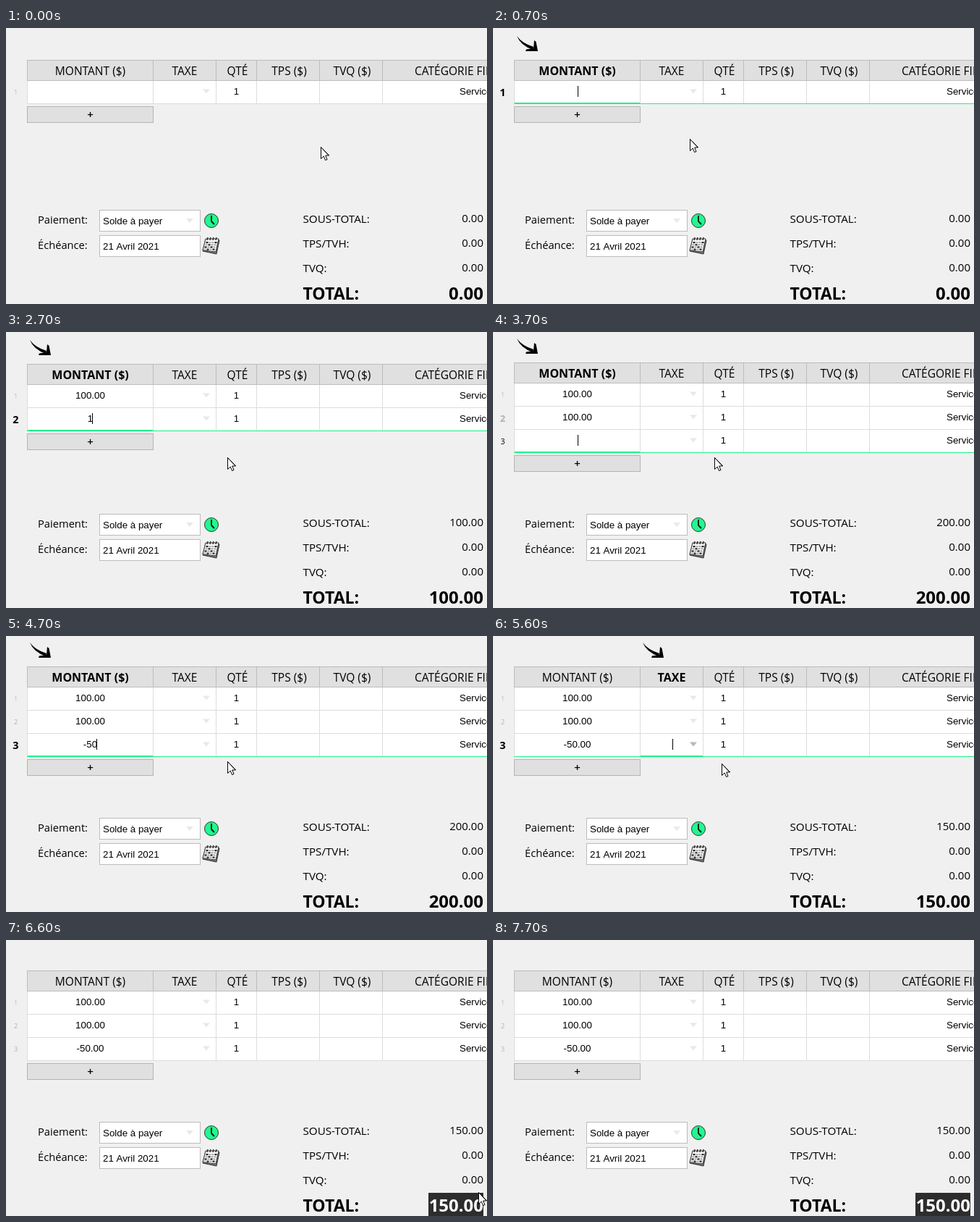
An HTML page with a canvas for the animation above (8.45 s loop, 665 by 381 pixels).

```html
<!DOCTYPE html>
<html lang="fr">
<head>
<meta charset="utf-8">
<title>Facture</title>
<style>
  html, body { margin: 0; width: 100%; height: 100%; overflow: hidden; background: #f0f0f0; }
  canvas { display: block; }
</style>
</head>
<body>
<canvas id="stage" width="665" height="381"></canvas>
<script>
const ctx = document.getElementById('stage').getContext('2d');
const LOOP = 8450, STEP = 50;
const GREEN = '#22ee8c', LINE = '#dddddd', BORDER = '#bcbcbc';
const UI = '"Open Sans", "Noto Sans", sans-serif';
const INPUT = '13.333px "Liberation Sans", Arial, sans-serif';
const ROW = 32;

const columns = [
  { x: 29, right: 203, label: 'MONTANT ($)' },
  { x: 203, right: 290, label: 'TAXE' },
  { x: 290, right: 346, label: 'QTÉ', centre: 320 },
  { x: 346, right: 433, label: 'TPS ($)', centre: 391.5 },
  { x: 433, right: 520, label: 'TVQ ($)', centre: 478.5 },
  { x: 520, right: 700, label: 'CATÉGORIE FINANCIÈRE', left: 565 }
];

// [time, row, content of the amount field]
const edits = [
  [500, 0, ''], [1500, 0, '1'], [1850, 0, '10'], [1950, 0, '100'], [2400, 0, '100.00'],
  [2400, 1, ''], [2700, 1, '1'], [3050, 1, '10'], [3150, 1, '100'], [3650, 1, '100.00'],
  [3650, 2, ''], [4050, 2, '-'], [4600, 2, '-5'], [4700, 2, '-50'], [5100, 2, '-50.00']
];
const focusTimes = [500, 2400, 3650, 6350];
const TAX_FOCUS = 5100, BLUR = 6350;

// [time, x, y] of the pointer's hot spot
const pointerPath = [
  [0, 435, 164], [450, 150, 92], [550, 150, 92], [700, 272, 153], [800, 306, 173],
  [5550, 306, 173], [5600, 316, 176], [6000, 576, 343], [6050, 580, 355],
  [6300, 580, 355], [6350, 584, 360], [6550, 657, 366], [6700, 640, 296],
  [7500, 640, 296], [7650, 393, 375]
];

const clamp = v => Math.max(0, Math.min(1, v));
const smooth = v => { v = clamp(v); return v * v * (3 - 2 * v); };

function text(str, x, y, font, align = 'left', color = '#000') {
  ctx.font = font;
  ctx.textAlign = align;
  ctx.fillStyle = color;
  ctx.fillText(str, x, y);
}

function rect(x, y, w, h, color) {
  ctx.fillStyle = color;
  ctx.fillRect(x, y, w, h);
}

function box(x, y, w, h, fill, border = BORDER) {
  rect(x, y, w, h, border);
  rect(x + 1, y + 1, w - 2, h - 2, fill);
}

function path(points, fill, stroke, width = 1) {
  ctx.beginPath();
  points.forEach(([x, y]) => ctx.lineTo(x, y));
  if (fill) {
    ctx.closePath();
    ctx.fillStyle = fill;
    ctx.fill();
  }
  if (stroke) {
    ctx.strokeStyle = stroke;
    ctx.lineWidth = width;
    ctx.stroke();
  }
}

function at(x, y, draw) {
  ctx.save();
  ctx.translate(x, y);
  draw();
  ctx.restore();
}

const triangle = (x, y, color) => path([[x - 5, y - 3], [x + 5, y - 3], [x, y + 3]], color);

function stateAt(t) {
  const past = edits.filter(e => e[0] <= t);
  const last = past[past.length - 1];
  const amounts = [''];
  past.forEach(([, row, value]) => amounts[row] = value);
  const total = amounts.filter(v => v.includes('.')).reduce((sum, v) => sum + Number(v), 0);
  const focused = Boolean(last) && t < BLUR;
  return {
    amounts,
    total: total.toFixed(2),
    row: focused ? last[1] : -1,
    column: focused ? (t >= TAX_FOCUS ? 1 : 0) : -1,
    caret: focused && (t - last[0]) % 1100 < 550,
    lift: t >= 3650 ? 2 : 0
  };
}

function drawRowNumber(t, row, state, y) {
  const rise = smooth((t - focusTimes[row] + 20) / 200);
  const fall = smooth((t - focusTimes[row + 1] + 20) / 200);
  const active = rise - fall;
  const size = 9 + 5.5 * active;
  const color = row === state.row ? '#000' : row ? '#b0b0b0' : '#b4bce6';
  text(row + 1, 13.5, y + 16 + size * 0.36,
    `${active > 0.5 ? 'bold ' : ''}${size}px ${UI}`, 'center', color);
}

function drawRow(t, row, state, y) {
  const active = row === state.row;
  rect(29, y, 636, ROW, '#fff');
  columns.forEach(c => rect(c.x, y, 1, ROW, LINE));
  rect(29, y + ROW - 1, 636, 1, active ? GREEN : LINE);
  if (active) {
    const c = columns[state.column];
    rect(c.x + 1, y + ROW - 2, c.right - c.x - 1, 2, GREEN);
  }
  const value = state.amounts[row];
  text(value, 116.5, y + 19, INPUT, 'center');
  if (active && state.caret) {
    const half = ctx.measureText(value).width / 2;
    const x = state.column ? 248 : value ? Math.floor(116 + half) : 117;
    rect(x, y + 7, 1, 15, '#000');
  }
  triangle(277, y + 14.5, active && state.column === 1 ? '#b9b9b9' : '#e9e9e9');
  text('1', 318.5, y + 19, INPUT, 'center');
  text('Services', 627, y + 19, INPUT);
  drawRowNumber(t, row, state, y);
}

function drawTable(t, state) {
  const top = 44 - state.lift;
  state.amounts.forEach((_, row) => drawRow(t, row, state, top + 29 + row * ROW));
  columns.forEach((c, i) => {
    box(c.x, top, c.right - c.x + 1, 29, '#e0e0e0');
    const font = i === state.column ? `bold 16px ${UI}` : `15.5px ${UI}`;
    const centre = c.centre || (c.x + c.right + 1) / 2;
    text(c.label, c.left || centre, top + 21, font, c.left ? 'left' : 'center');
  });
  const buttonY = top + 32 + state.amounts.length * ROW;
  box(29, buttonY, 175, 23, '#e0e0e0', '#b4b4b4');
  text('+', 116.5, buttonY + 16.5, `600 15px ${UI}`, 'center');
  if (state.column >= 0) at(state.column * 174, -state.lift, drawHintArrow);
}

function drawHintArrow() {
  ctx.beginPath();
  ctx.moveTo(33, 11);
  ctx.quadraticCurveTo(40, 21, 56, 26);
  ctx.lineTo(55, 30);
  ctx.quadraticCurveTo(38, 24, 33, 11);
  ctx.fillStyle = '#000';
  ctx.fill();
  path([[57, 17], [59.5, 19], [62, 32], [45, 32], [46, 29.5], [56, 28]], '#000');
}

function drawClock() {
  ctx.beginPath();
  ctx.arc(284, 266, 9.5, 0, 7);
  ctx.fillStyle = '#20f88e';
  ctx.fill();
  ctx.strokeStyle = '#333';
  ctx.lineWidth = 1;
  ctx.stroke();
  path([[284, 259], [284, 267], [288, 271]], null, '#111', 1.8);
}

function drawCalendar() {
  path([[276, 292], [295, 293], [291, 312], [272, 308]], '#777', '#333');
  path([[276, 291], [294, 291], [290, 309], [272, 307]], '#fff', '#333');
  for (let r = 0; r < 4; r++) {
    for (let c = 0; c < 4; c++) {
      rect(276.5 + c * 4 - r, 295 + r * 3.2, 3, 2.2, (r * 3 + c * 2) % 5 < 2 ? '#222' : '#aaa');
    }
  }
  for (let i = 0; i < 4; i++) path([[279 + i * 4, 289], [278 + i * 4, 293]], null, '#333', 1.5);
}

function drawPayment() {
  text('Paiement:', 44, 270, `14.7px ${UI}`);
  text('Échéance:', 44, 305, `14.7px ${UI}`);
  box(129, 251, 140, 30, '#fff');
  box(129, 286, 140, 30, '#fff');
  text('Solde à payer', 134, 271, INPUT);
  text('21 Avril 2021', 134, 306, INPUT);
  triangle(254, 266, '#e9e9e9');
  drawClock();
  drawCalendar();
}

function drawTotals(t, total) {
  [['SOUS-TOTAL:', total], ['TPS/TVH:', '0.00'], ['TVQ:', '0.00']].forEach(([label, value], i) => {
    const y = 268.5 + i * 34;
    text(label, 410.5, y, `15.2px ${UI}`);
    text(value, 660, y - 0.5, `15px ${UI}`, 'right');
  });
  const font = `bold 24px ${UI}`;
  text('TOTAL:', 410.5, 375, `bold 23px ${UI}`);
  text(total, 660, 375, font, 'right');
  const selected = 76 * clamp((t - 6350) / 200);
  if (selected) {
    ctx.save();
    ctx.beginPath();
    ctx.rect(584, 349, selected, 32);
    ctx.clip();
    rect(584, 349, 76, 32, '#2d2d2d');
    text(total, 660, 375, font, 'right', '#fff');
    ctx.restore();
  }
}

function drawPointer(t) {
  if (t >= 7700) return;
  const next = pointerPath.findIndex(p => p[0] > t);
  const b = pointerPath[next < 0 ? pointerPath.length - 1 : next];
  const a = next < 0 ? b : pointerPath[next - 1];
  const k = b === a ? 0 : smooth((t - a[0]) / (b[0] - a[0]));
  const x = Math.round(a[1] + (b[1] - a[1]) * k);
  const y = Math.round(a[2] + (b[2] - a[2]) * k);
  const overText = (y > 73 && y < 105) || (y > 349 && x > 570);
  at(x, y, overText ? drawTextPointer : drawArrowPointer);
}

function drawTextPointer() {
  rect(0, -6, 1, 13, '#000');
  for (const y of [-7, 7]) {
    rect(-3, y, 3, 1, '#000');
    rect(1, y, 3, 1, '#000');
  }
}

function drawArrowPointer() {
  path([[0.5, 0.5], [0.5, 16.5], [4.2, 13], [6.6, 18.5], [9, 17.5], [6.7, 12], [11.5, 12]],
    '#fff', '#000');
  path([[0.5, 1], [0.5, 0.5], [11.5, 12]], null, '#000');
}

function draw(now) {
  const t = Math.floor(now % LOOP / STEP) * STEP;
  const state = stateAt(t);
  rect(0, 0, 665, 381, '#f0f0f0');
  drawTable(t, state);
  drawPayment();
  drawTotals(t, state.total);
  drawPointer(t);
}

const start = performance.now();
function frame() {
  draw(performance.now() - start);
  requestAnimationFrame(frame);
}
frame();
</script>
</body>
</html>
```
